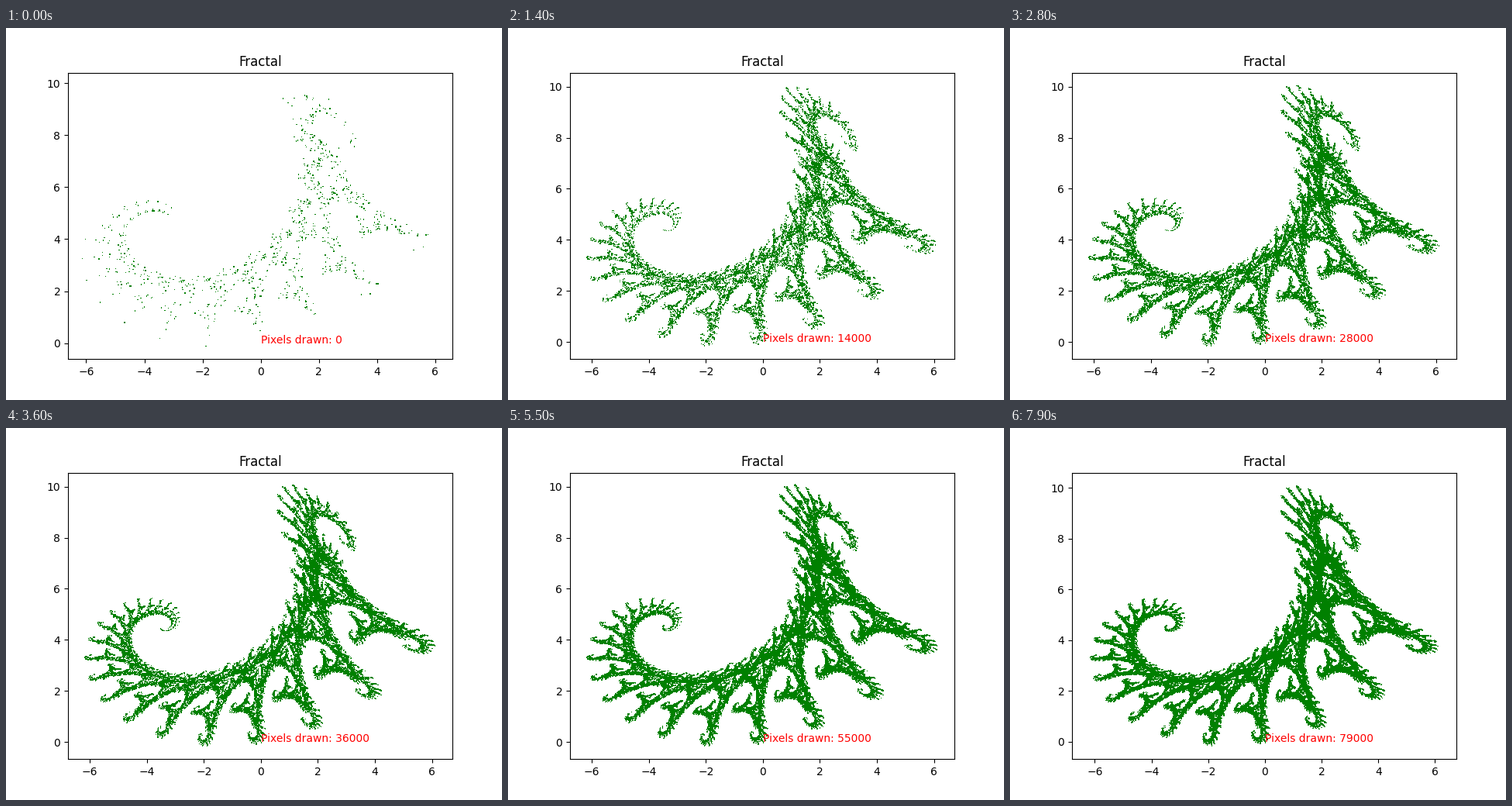
Recreate the animation shown at these times as a matplotlib script. Size 640 by 480 pixels, loop 8 s.

```python
import random

import matplotlib.pyplot as plt
import numpy as np
from matplotlib.animation import FuncAnimation

FRAMES = 80
STEP = 1000
MARGIN = 0.05

# Two affine maps: x' = ax + by + e, y' = cx + dy + f
MAPS = (
    (0.824074, 0.281482, -0.212346, 0.864198, -1.882290, -0.110607),
    (0.088272, 0.520988, -0.463889, -0.377778, 0.785360, 8.095795),
)
P_FIRST = 0.75

# Lower left and upper right corner of the cloud, at the start and filled
EARLY = np.array([(-6.025, -0.11), (5.99, 9.90)])
FULL = np.array([(-6.19, -0.17), (6.14, 10.08)])
SETTLED = 66


def orbit(count, seed=3):
    rng = random.Random(seed)
    points = np.empty((count, 2))
    x = y = 0.0
    for i in range(count):
        a, b, c, d, e, f = MAPS[rng.random() >= P_FIRST]
        x, y = a * x + b * y + e, c * x + d * y + f
        points[i] = x, y
    return points


def limits(i):
    """The view widens in quarter steps, fast at first."""
    growth = min(1, np.floor(4 * (i / SETTLED) ** 0.125) / 4)
    low, high = EARLY + (FULL - EARLY) * growth
    pad = MARGIN * (high - low)
    return zip(low - pad, high + pad)


points = orbit(FRAMES * STEP)

fig, ax = plt.subplots(figsize=(6.4, 4.8), dpi=100)
ax.set_title("Fractal")
dots = ax.scatter([], [], s=1, marker="s", color="green", edgecolors="none")
label = ax.text(0, 0, "", color="red")


def update(i):
    dots.set_offsets(points[:(i + 1) * STEP])
    label.set_text(f"Pixels drawn: {i * STEP}")
    xlim, ylim = limits(i)
    ax.set(xlim=xlim, ylim=ylim)
    return dots, label


anim = FuncAnimation(fig, update, frames=FRAMES, interval=100,
                     init_func=lambda: update(0), repeat=True, repeat_delay=0)
plt.show()
```
